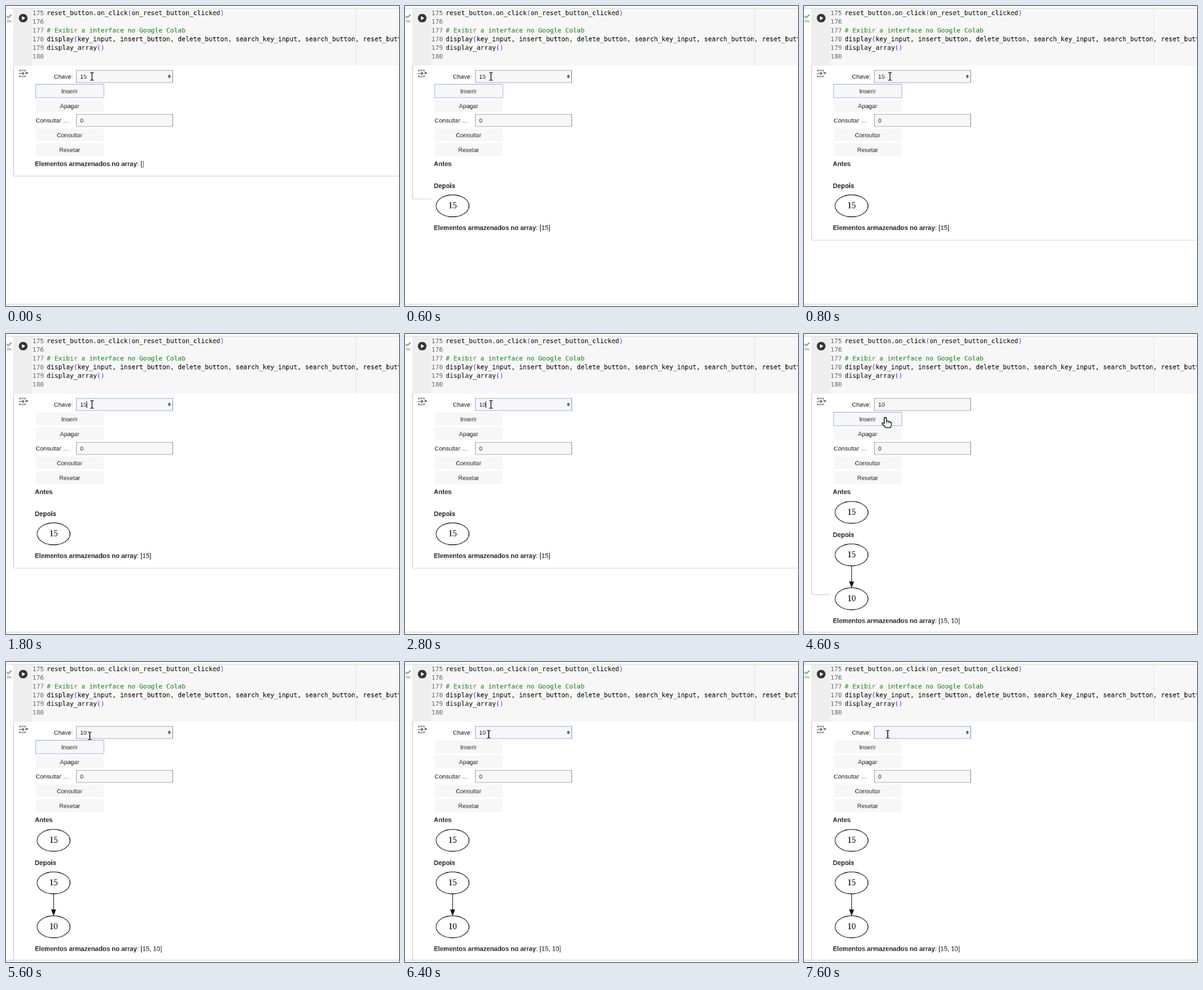
Recreate the animation shown at these times as an HTML page with a canvas. Size 600 by 458 pixels, loop 8000 ms.

```html
<!DOCTYPE html>
<html lang="pt">
<head>
<meta charset="utf-8">
<style>
html, body { margin: 0; width: 100%; height: 100%; overflow: hidden; background: #fff; }
canvas { display: block; }
</style>
</head>
<body>
<canvas id="stage" width="600" height="458"></canvas>
<script>
// The page is laid out at full screen size and shown scaled down.
const W = 859, H = 656, LOOP = 8000;
const view = document.getElementById('stage').getContext('2d');
const page = document.createElement('canvas');
page.width = W;
page.height = H;
const ctx = page.getContext('2d');

const SANS = '"Liberation Sans", Arial, sans-serif';
const MONO = '14px "DejaVu Sans Mono", monospace';
const UI = '13px ' + SANS;
const BODY = '14px ' + SANS;
const BOLD = 'bold ' + BODY;
const SERIF = '18.67px "Liberation Serif", Times, serif';
const INK = '#212121';
const BLUE = '#5a8dea';
const GRAY = '#808080';
const BRACKET = '#6a1cf0';

// Each step overrides part of the state from its time on.
const steps = [
  [0, { key: '15', focus: 'insert', caret: false, spin: true, cursor: 'beam', x: 188, y: 154, items: [], edge: 372, narrow: false }],
  [600, { items: [15], edge: 422, narrow: true }],
  [800, { edge: 512, narrow: false }],
  [1800, { focus: 'key', caret: true }],
  [2000, { key: '1', caret: false }],
  [2400, { caret: true }],
  [2800, { key: '10' }],
  [3000, { cursor: 'hand', x: 178, y: 182.5, spin: false }],
  [3400, { caret: false }],
  [3600, { focus: 'insert' }],
  [4600, { items: [15, 10], edge: 570, narrow: true }],
  [4800, { edge: 652 }],
  [5600, { cursor: 'beam', x: 183, y: 161.5, spin: true }],
  [5800, { focus: 'key', caret: true, y: 158 }],
  [6400, { caret: false }],
  [6600, { key: '1' }],
  [7000, { key: '', caret: true }],
  [7600, { caret: false }]
];

function stateAt(t) {
  return Object.assign({}, ...steps.filter(s => s[0] <= t).map(s => s[1]));
}

function rect(x, y, w, h, color) {
  ctx.fillStyle = color;
  ctx.fillRect(x, y, w, h);
}

function frame(x, y, w, h, color) {
  ctx.strokeStyle = color;
  ctx.lineWidth = 1;
  ctx.strokeRect(x + 0.5, y + 0.5, w - 1, h - 1);
}

function text(s, x, y, font, color = INK, align = 'left') {
  ctx.font = font;
  ctx.fillStyle = color;
  ctx.textAlign = align;
  ctx.fillText(s, x, y);
  return x + ctx.measureText(s).width;
}

function line(points, color, width) {
  ctx.beginPath();
  points.forEach(([x, y]) => ctx.lineTo(x, y));
  ctx.strokeStyle = color;
  ctx.lineWidth = width;
  ctx.stroke();
}

function shape(points, color) {
  ctx.beginPath();
  points.forEach(([x, y]) => ctx.lineTo(x, y));
  ctx.closePath();
  ctx.fillStyle = color;
  ctx.fill();
}

const code = [
  'reset_button.on_click(on_reset_button_clicked)',
  '',
  '# Exibir a interface no Google Colab',
  'display(key_input, insert_button, delete_button, search_key_input, search_button, reset_button)',
  'display_array()',
  ''
];

function drawCode() {
  rect(16, 6, W, 124, '#f7f7f7');
  rect(16, 6, 41, 124, '#eeeeee');
  rect(764, 6, 1, 124, '#d8d8d8');
  rect(0, 4, W, 1, '#dadada');
  rect(0, 5, W, 1, '#e6e6e6');

  code.forEach((row, i) => {
    const y = 20 + i * 19;
    text(175 + i, 83, y, MONO, '#6b6b6b', 'right');
    if (row[0] === '#') return text(row, 89, y, MONO, '#0a8a0a');
    let x = 89;
    row.split(/([()])/).forEach(part => {
      x = text(part, x, y, MONO, /[()]/.test(part) ? BRACKET : '#000');
    });
  });

  // run button and status
  ctx.beginPath();
  ctx.arc(37.5, 26.5, 9.5, 0, 7);
  ctx.fillStyle = '#333';
  ctx.fill();
  shape([[35, 22], [35, 31], [42, 26.5]], '#fff');
  line([[1.5, 22], [5, 25.5], [12, 18.5]], '#2ea043', 1.8);
  text('0s', 2, 36, '9px ' + SANS, '#666');
}

function drawOutputIcon() {
  const gray = '#555';
  line([[30, 143], [30, 140.5], [42, 140.5], [42, 143]], gray, 1.7);
  line([[30, 152], [30, 154.5], [42, 154.5], [42, 152]], gray, 1.7);
  line([[28, 147.5], [39, 147.5]], gray, 1.7);
  line([[35.5, 144], [39, 147.5], [35.5, 151]], gray, 1.7);
  shape([[41.2, 145.3], [49.2, 145.3], [45.2, 149.5]], gray);
}

function drawEdge({ edge, narrow }) {
  rect(16, 130, 1, edge - 130, '#d0d0d0');
  rect(17, 130, 1, edge - 130, '#f0f0f0');
  const w = narrow ? 40 : W;
  rect(17, edge - 1, w, 1, '#d8d8d8');
  rect(17, edge, w, 1, '#e8e8e8');
  rect(0, 651, W, 1, '#dcdcdc');
  rect(0, 652, W, 1, '#dcdcdc');
}

function input(y, value, color) {
  rect(153, y, 212, 28, '#f7f7f7');
  frame(153, y, 212, 28, color);
  return text(value, 162, y + 19, UI);
}

function drawForm(s) {
  text('Chave:', 146, 159, UI, INK, 'right');
  const end = input(140, s.key, s.focus === 'key' ? BLUE : GRAY);
  if (s.caret) rect(Math.floor(end), 147, 1, 15, '#000');
  if (s.spin) {
    [-1, 1].forEach(d => shape([[353.8, 154 + d * 0.4], [360.2, 154 + d * 0.4], [357, 154 + d * 3.8]], '#333'));
  }
  text('Consultar …', 65, 255, UI);
  input(236, '0', GRAY);

  [['Inserir', 172], ['Apagar', 204], ['Consultar', 268], ['Resetar', 300]].forEach(([label, y]) => {
    rect(65, y, 148, 28, '#f7f7f7');
    text(label, 139, y + 19, UI, INK, 'center');
  });
  if (s.focus === 'insert') frame(64, 171, 150, 30, BLUE);
}

function chain(items, top) {
  const x = 104;
  items.forEach((value, i) => {
    const y = top + i * 96;
    ctx.beginPath();
    ctx.ellipse(x, y, 36, 24, 0, 0, Math.PI * 2);
    ctx.strokeStyle = '#000';
    ctx.lineWidth = 1.33;
    ctx.stroke();
    text(value, x, y + 5, SERIF, '#000', 'center');
    if (!i) return;
    const tip = y - 24;
    line([[x, y - 72], [x, tip - 13]], '#000', 1.33);
    shape([[x - 5.3, tip - 14], [x + 5.3, tip - 14], [x, tip + 0.5]], '#000');
  });
}

function drawResult(items) {
  let y = 350;
  if (items.length) {
    const before = items.slice(0, -1);
    const top = before.length ? 444 : 398;
    text('Antes', 63, 350, BOLD);
    chain(before, 390);
    text('Depois', 63, top, BOLD);
    chain(items, top + 39);
    y = top + 92 + (items.length - 1) * 96;
  }
  const x = text('Elementos armazenados no array', 63, y, BOLD);
  text(': [' + items.join(', ') + ']', x, y, BODY);
}

function drawBeam() {
  ctx.scale(1.43, 1.43);
  const arm = [[-2.7, -6], [-0.8, -5.6], [0, -4.8], [0, 4.8], [-0.8, 5.6], [-2.7, 6]];
  const flip = arm.map(([x, y]) => [-x, y]);
  [['#fff', 2.6], ['#111', 1]].forEach(([color, width]) => {
    line(arm, color, width);
    line(flip, color, width);
  });
}

function drawHand() {
  ctx.scale(1.6, 1.6);
  ctx.beginPath();
  ctx.moveTo(-1.6, 8.2);
  ctx.lineTo(-1.6, 1.4);
  ctx.quadraticCurveTo(-1.5, 0, -0.1, 0);
  ctx.quadraticCurveTo(1.3, 0, 1.4, 1.4);
  ctx.lineTo(1.4, 5);
  ctx.quadraticCurveTo(3, 4, 4, 5.6);
  ctx.quadraticCurveTo(5.6, 4.8, 6.3, 6.4);
  ctx.quadraticCurveTo(8.2, 5.8, 8.3, 8);
  ctx.quadraticCurveTo(8.5, 11, 6.8, 13.9);
  ctx.lineTo(0, 13.9);
  ctx.quadraticCurveTo(-1.6, 11.4, -4.6, 8.6);
  ctx.quadraticCurveTo(-5, 6.2, -1.6, 8.2);
  ctx.closePath();
  ctx.lineJoin = 'round';
  ctx.fillStyle = '#fff';
  ctx.fill();
  ctx.strokeStyle = '#111';
  ctx.lineWidth = 1.1;
  ctx.stroke();
  [1.4, 4, 6.3].forEach((x, i) => line([[x, 5 + i * 0.7], [x, 8.2]], '#111', 0.8));
}

function draw(now) {
  const s = stateAt(now % LOOP);
  rect(0, 0, W, H, '#fff');
  drawCode();
  drawOutputIcon();
  drawEdge(s);
  drawForm(s);
  drawResult(s.items);
  ctx.save();
  ctx.translate(s.x, s.y);
  s.cursor === 'hand' ? drawHand() : drawBeam();
  ctx.restore();
  view.drawImage(page, 0, 0, 600, 458);
}

const start = performance.now();
function tick() {
  draw(performance.now() - start);
  requestAnimationFrame(tick);
}
tick();
</script>
</body>
</html>
```
